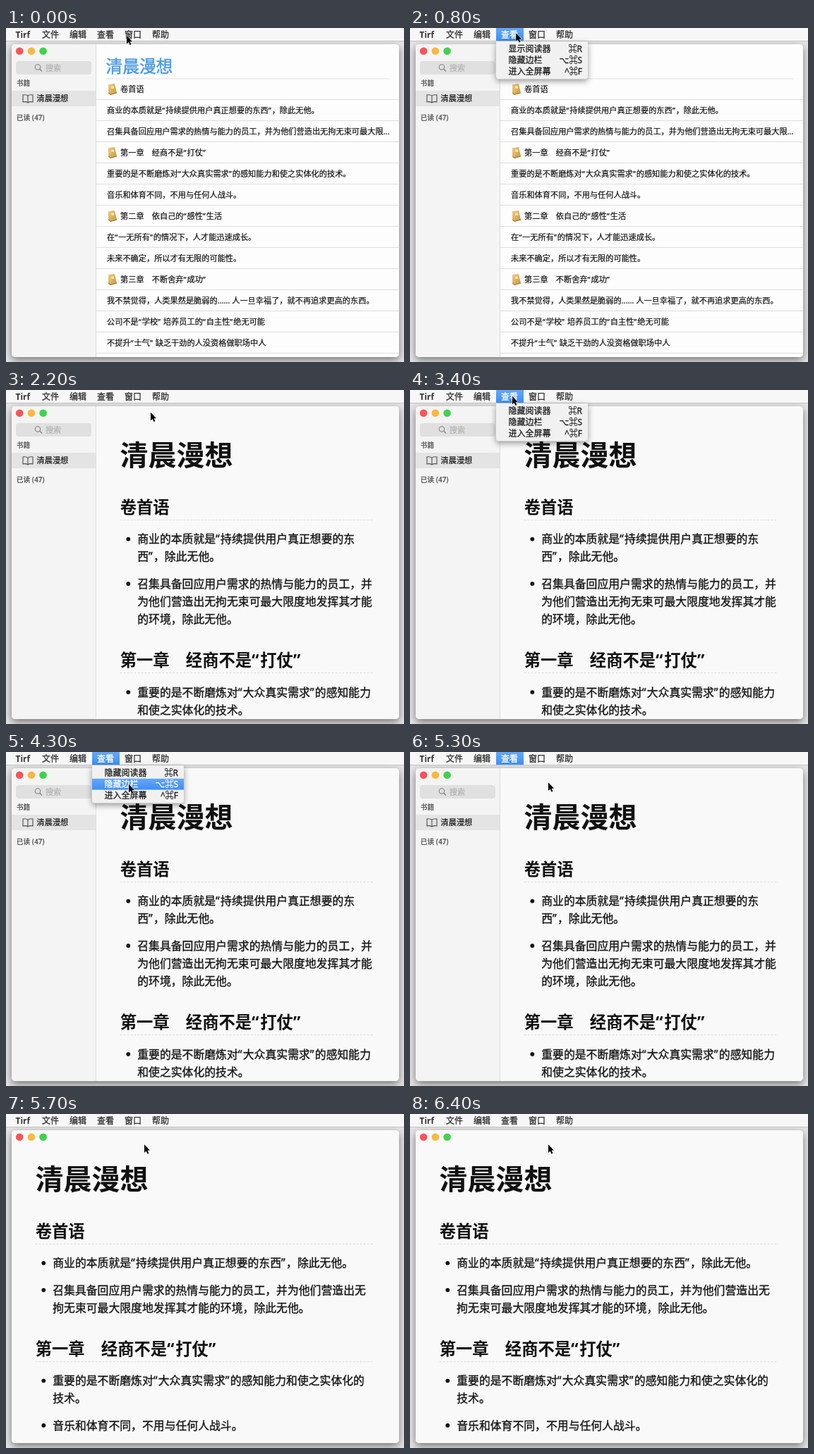
An HTML page that plays this animation: 564x474 px, repeating every 6500 ms.

```html
<!DOCTYPE html>
<html lang="zh-CN">
<head>
<meta charset="utf-8">
<title>Reader</title>
<style>
html, body { margin: 0; width: 100%; height: 100%; overflow: hidden; background: #e6e6e6; }
svg { display: block; width: 564px; height: 474px; }
text {
  font-family: "Noto Sans", "Noto Sans CJK SC", "Noto Sans CJK", "DejaVu Sans", sans-serif;
  white-space: pre; fill: currentColor; stroke: currentColor; stroke-width: .022em;
}
text[font-weight="700"] { stroke: none; }
.quote { letter-spacing: .08em; }
.win { filter: drop-shadow(0 4px 6px rgba(0,0,0,.5)); }
#menu > rect:first-child { filter: drop-shadow(0 3px 4px rgba(0,0,0,.4)); }
</style>
</head>
<body>
<svg viewBox="0 0 564 474" lang="zh-CN">
  <defs>
    <clipPath id="frame"><rect x="8" y="23" width="549" height="444" rx="5"/></clipPath>
    <linearGradient id="blue" x2="0" y2="1"><stop stop-color="#64a7fa"/><stop offset="1" stop-color="#3f8ff6"/></linearGradient>
    <linearGradient id="gold" x2="1" y2="1"><stop stop-color="#efcf83"/><stop offset="1" stop-color="#c8953c"/></linearGradient>
  </defs>
  <rect width="564" height="474" fill="#e6e6e6"/>
  <rect class="win" x="8" y="23" width="549" height="444" rx="5" fill="#f7f7f7"/>
  <g clip-path="url(#frame)">
    <g id="side"><rect x="8" y="23" width="120" height="444" fill="#f4f4f4"/></g>
    <g id="list"><rect x="128" y="23" width="429" height="444" fill="#fdfdfd"/></g>
    <g id="reader"></g>
    <line id="edge" y1="23" y2="467" stroke="#dcdcdc"/>
  </g>
  <g id="lights"></g>
  <rect width="564" height="18" fill="#f7f7f7"/>
  <rect y="18" width="564" height="1" fill="#c4c4c4"/>
  <rect id="hot" x="122" width="39" height="18" fill="url(#blue)"/>
  <g id="bar"></g>
  <g id="menu"></g>
  <path id="cursor" d="M0 .8V12.4L2.6 10L4.4 14L6.4 13.2L4.6 9.2H8Z" fill="#000" stroke="#fff" stroke-linejoin="round" paint-order="stroke"/>
</svg>
<script>
const $ = id => document.getElementById(id);
const BOOK = '清晨漫想';

function add(parent, tag, attrs, str) {
  const el = document.createElementNS('http://www.w3.org/2000/svg', tag);
  for (const k in attrs) el.setAttribute(k, attrs[k]);
  if (str) el.textContent = str;
  parent.appendChild(el);
  return el;
}

// cy is the vertical centre of the ideographs
function label(parent, x, cy, size, str, more) {
  const el = add(parent, 'text', { x, y: cy + size * .38, 'font-size': size, color: '#161616', ...more });
  for (const part of str.split(/([“”])/)) {
    if (part) add(el, 'tspan', /[“”]/.test(part) ? { class: 'quote' } : {}, part);
  }
  return el;
}

const chapters = [
  ['卷首语',
    '商业的本质就是“持续提供用户真正想要的东西”，除此无他。',
    '召集具备回应用户需求的热情与能力的员工，并为他们营造出无拘无束可最大限度地发挥其才能的环境，除此无他。'],
  ['第一章　经商不是“打仗”',
    '重要的是不断磨炼对“大众真实需求”的感知能力和使之实体化的技术。',
    '音乐和体育不同，不用与任何人战斗。'],
  ['第二章　依自己的“感性”生活',
    '在“一无所有”的情况下，人才能迅速成长。',
    '未来不确定，所以才有无限的可能性。'],
  ['第三章　不断舍弃“成功”',
    '我不禁觉得，人类果然是脆弱的…… 人一旦幸福了，就不再追求更高的东西。',
    '公司不是“学校” 培养员工的“自主性”绝无可能',
    '不提升“士气” 缺乏干劲的人没资格做职场中人']
];

function buildSidebar() {
  const g = $('side');
  add(g, 'rect', { x: 14, y: 47, width: 107, height: 19, rx: 4, fill: '#e0e0e0' });
  add(g, 'circle', { cx: 45, cy: 55.5, r: 3.7, fill: 'none', stroke: '#808080', 'stroke-width': 1.1 });
  add(g, 'path', { d: 'M47.8 58.3L51 61.5', stroke: '#808080', 'stroke-width': 1.3 });
  label(g, 56, 56.5, 11, '搜索', { color: '#b2b2b2' });
  label(g, 14.7, 78, 9.8, '书籍', { color: '#606060', 'font-weight': 700 });
  add(g, 'rect', { x: 8, y: 89, width: 120, height: 22, fill: '#e4e4e4' });
  add(g, 'path', { d: 'M31 96.2Q28 94 24 95V105Q28 104 31 106Q34 104 38 105V95Q34 94 31 96.2V106', fill: 'none', stroke: '#505050', 'stroke-width': 1.1 });
  label(g, 43.5, 100, 11.2, BOOK);
  label(g, 14.7, 127, 9.8, '已读 (47)', { color: '#606060', 'font-weight': 700 });
}

function buildList() {
  const g = $('list');
  label(g, 141.5, 54, 23.7, BOOK, { color: '#4b9ae2' });
  add(g, 'path', { d: 'M142 72H543', stroke: '#c4c4c4', 'stroke-dasharray': '1 1' });
  let y = 87;
  for (const chapter of chapters) {
    chapter.forEach((str, i) => {
      if (!i) {
        add(g, 'path', { d: `M145 ${y - 7}L154 ${y - 8}L157 ${y + 5}L148 ${y + 8}L145 ${y + 5}Z`, fill: 'url(#gold)' });
        add(g, 'path', { d: `M145 ${y + 5}L148 ${y + 7.5}L157 ${y + 5}`, fill: 'none', stroke: '#8e6a35' });
        add(g, 'path', { d: `M149 ${y - 4}L152.5 ${y - 4.5}L153.2 ${y - 1.5}L149.6 ${y - 1}Z`, fill: '#f8e9bd' });
      }
      const shown = str.length > 50 ? str.slice(0, 35) + '…' : str;
      label(g, i ? 143 : 162, y, 11.2, shown);
      add(g, 'path', { d: `M128 ${y + 14.5}H557`, stroke: '#dedede' });
      y += 30;
    });
  }
}

// Breaks text by character advance; closing marks never begin a line.
function wrap(str, size, width) {
  const lines = [];
  while (str) {
    let n = 0, w = 0;
    while (n < str.length && (w += size * ('“”'.includes(str[n]) ? .48 : 1)) <= width) n++;
    while (n < str.length && '，。”'.includes(str[n])) n--;
    lines.push(str.slice(0, n));
    str = str.slice(n);
  }
  return lines;
}

// Page laid out for a view whose left edge is at `left`.
function buildPage(left) {
  const g = add($('reader'), 'g', {});
  const right = 519.5 - left, size = 15.85;
  add(g, 'rect', { y: 23, width: 557 - left, height: 444, fill: '#f9f9f9' });
  label(g, 33.5, 92, 40, BOOK, { 'font-weight': 700, color: '#111' });
  let y = 166;
  for (const [head, ...items] of chapters) {
    if (y > 480) break;
    label(g, 33.7, y, 23.3, head, { 'font-weight': 700, color: '#111' });
    add(g, 'path', { d: `M33.5 ${Math.round(y + 18) + .5}H${right}`, stroke: '#dcdcdc', 'stroke-dasharray': '3 2' });
    y += 45.3;
    for (const item of items) {
      add(g, 'circle', { cx: 45.3, cy: y + .3, r: 2.9, fill: '#111' });
      for (const line of wrap(item, size, right - 58)) {
        label(g, 58.2, y, size, line);
        y += 25.1;
      }
      y += 13.1;
    }
    y += 20.2;
  }
  return g;
}

function buildChrome() {
  ['#f4565a', '#f9b841', '#3fd24e'].forEach((fill, i) =>
    add($('lights'), 'circle', { cx: 19.2 + i * 16.7, cy: 32.8, r: 5.3, fill }));
  label($('bar'), 13.6, 9.2, 11.8, 'Tirf', { 'font-weight': 700, color: '#333' });
  return ['文件', '编辑', '查看', '窗口', '帮助'].map((s, i) =>
    label($('bar'), 51 + i * 39, 9.2, 12, s, { color: '#2c2c2c' }));
}

function buildMenu() {
  const g = $('menu');
  add(g, 'rect', { x: 122, y: 19, width: 130, height: 53.5, rx: 4, fill: '#f1f1f1' });
  add(g, 'rect', { x: 122, y: 19, width: 130, height: 6, fill: '#f1f1f1' });
  const mark = add(g, 'rect', { x: 122, width: 130, height: 15.8, fill: 'url(#blue)' });
  const rows = [['显示阅读器', '⌘R'], ['隐藏边栏', '⌥⌘S'], ['进入全屏幕', '^⌘F']].map(([a, b], i) => [
    label(g, 139.5, 29.5 + i * 15.8, 12, a),
    label(g, 244, 29.5 + i * 15.8, 12, b, { 'text-anchor': 'end' })
  ]);
  return { mark, rows };
}

buildSidebar();
buildList();
const heads = buildChrome();
const { mark, rows } = buildMenu();

// time, view edge, edge the page was laid out for
const slide = [[2200, 128, 128], [5400, 112, 124], [5500, 50, 84], [5600, 12, 20], [5700, 8, 8]]
  .map(([at, edge, left]) => ({ at, edge, page: buildPage(left) }));

const path = [
  [0, 171, 10], [100, 171, 10], [500, 147, 5], [700, 147, 5], [1400, 205, 31], [2700, 205, 31],
  [3200, 145, 8], [3500, 145, 8], [4000, 146, 39], [4300, 174, 45], [4700, 196, 42.5], [6500, 196, 42.5]
];
const opens = [
  { on: 500, blink: 1800, fade: 2000, name: '显示阅读器' },
  { on: 3400, blink: 5000, fade: 5200, name: '隐藏阅读器' }
];

function pointer(t) {
  const i = path.findIndex(p => p[0] > t);
  const [t0, x0, y0] = path[i - 1], [t1, x1, y1] = path[i];
  const u = (t - t0) / (t1 - t0), k = u * u * (3 - 2 * u);
  return [x0 + (x1 - x0) * k, y0 + (y1 - y0) * k];
}

const show = (el, on) => el.setAttribute('display', on ? 'inline' : 'none');

function draw(t) {
  const [x, y] = pointer(t);
  $('cursor').setAttribute('transform', `translate(${x} ${y})`);

  const step = slide.filter(s => s.at <= t).pop();
  const edge = step ? step.edge : 128;
  show($('list'), !step);
  for (const s of slide) show(s.page, s === step);
  if (step) step.page.setAttribute('transform', `translate(${edge} 0)`);
  $('edge').setAttribute('x1', edge - .5);
  $('edge').setAttribute('x2', edge - .5);

  const open = opens.find(o => t >= o.on && t < o.fade + 200);
  show($('hot'), open);
  heads[2].setAttribute('color', open ? '#fff' : '#2c2c2c');
  show($('menu'), open && t <= open.fade);
  if (!open) return;
  $('menu').setAttribute('opacity', t === open.fade ? .5 : 1);
  rows[0][0].textContent = open.name;
  const row = t === open.blink ? -1 : Math.floor((y - 22) / 15.8);
  show(mark, row >= 0);
  mark.setAttribute('y', 22 + row * 15.8);
  rows.forEach((pair, i) => pair.forEach(el => el.setAttribute('color', i === row ? '#fff' : '#1c1c1c')));
}

const start = performance.now();
function tick() {
  const t = (performance.now() - start) % 6500;
  draw(Math.floor(t / 100) * 100);
  requestAnimationFrame(tick);
}
tick();
</script>
</body>
</html>
```
